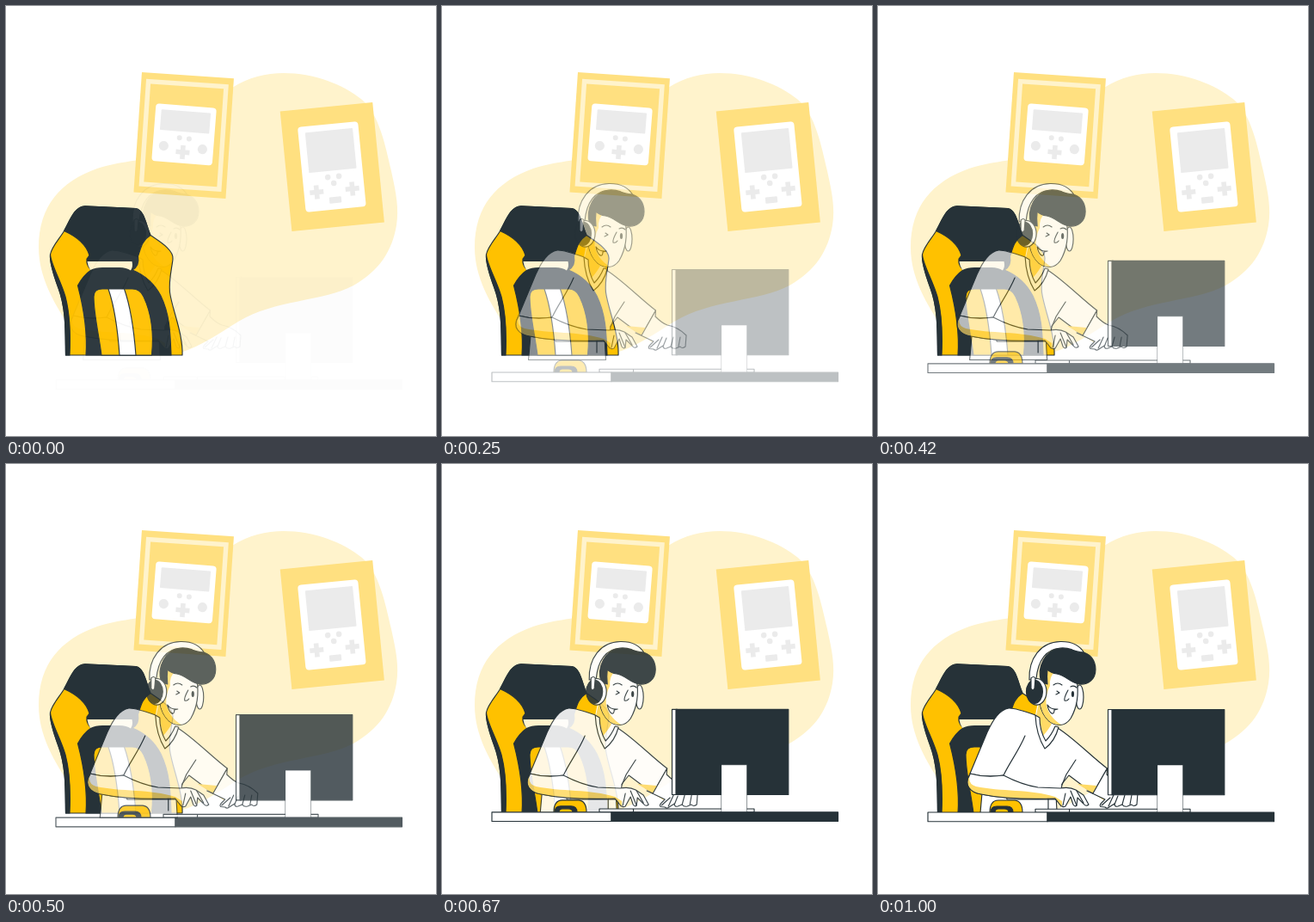
Animation, 500 px wide and 500 px high, one loop 1.04 s. Source, as an HTML page:

```html
<!DOCTYPE html>
<html lang="en">
<head>
<meta charset="utf-8">
<title>Gamer at a desk</title>
<style>
  html, body { margin: 0; width: 100%; height: 100%; overflow: hidden; background: #fff; }
  svg { display: block; width: 100vw; height: 100vh; }
  .pale { fill: #fff3cc; }
  .soft { fill: #ffe080; }
  .grey { fill: #ebebeb; }
  .white { fill: #fff; }
  .gold { fill: #ffc100; }
  .shade { fill: #ffda66; }
  .dark { fill: #263238; }
  .line { stroke: #263238; stroke-width: 1.15; stroke-linejoin: round; stroke-linecap: round; }
  .bare { fill: none; }
</style>
</head>
<body>
<svg viewBox="0 0 500 500">
  <defs>
    <path id="plus" d="M-2.8-8H2.8V-2.8H8V2.8H2.8V8H-2.8V2.8H-8V-2.8H-2.8Z"/>
  </defs>

  <path class="pale" d="M323 78C358 78 392 91 414 109C434 126 441 162 448 192C454 219 457 236 454 255C449 285 434 308 404 325C368 344 313 341 270 367C247 381 228 395 203 403C160 413 100 405 70 367C56 345 38 315 38 281C38 232 64 204 106 189C137 179 163 181 187 169C217 152 230 120 263 95C282 83 302 78 323 78Z"/>

  <!-- wall posters -->
  <g transform="translate(206.7 150.4) rotate(3.9)">
    <rect class="soft" x="-53.6" y="-70" width="107.2" height="140"/>
    <rect x="-45.3" y="-59.8" width="90.6" height="119.6" fill="none" stroke="#fff3cc" stroke-width="5.4"/>
    <g transform="translate(.3 -1) rotate(.6)">
      <rect class="white" x="-35.3" y="-33.5" width="70.6" height="67" rx="4"/>
      <g class="grey">
        <rect x="-28.5" y="-27.2" width="57.5" height="24" rx="1"/>
        <circle cx="-22.6" cy="15" r="5.6"/><circle cx="22.6" cy="15.5" r="5.6"/>
        <circle cx="-5" cy="4.3" r="3"/><circle cx="6.2" cy="4.5" r="3"/>
        <use href="#plus" y="20.6"/>
      </g>
    </g>
  </g>
  <g transform="translate(379.3 187) rotate(-5.6)">
    <rect class="soft" x="-54" y="-70" width="108" height="140"/>
    <rect class="white" x="-35.6" y="-49.8" width="70.4" height="99.4" rx="4"/>
    <g class="grey">
      <rect x="-27.5" y="-42.5" width="55.5" height="47" rx="1"/>
      <circle cx="-6.3" cy="11.6" r="3.3"/><circle cx="6.7" cy="11.6" r="3.3"/><circle cy="19.1" r="3.3"/>
      <use href="#plus" x="-20.8" y="27.6"/><use href="#plus" x="20.8" y="27.6"/>
      <rect x="-7" y="35" width="14" height="7.4" rx="1"/>
    </g>
  </g>

  <!-- chair -->
  <g class="line">
    <path class="gold" d="M69.500 406C69 378 70 352 61 328C54 309 51 296 51.500 289C53 280 62 271 68 261C75 248 80 233 92 232.700L151 235.500C161 237 163 256 168 266.500C177 273 195 283 194 294C193 305 189 318 190.500 333C193 352 206 381 205 406Z"/>
    <path class="dark" d="M51.500 289C52 300 64 320 69 338C75 361 75 383 74 406H69.500C69 378 70 352 61 328C54 309 51 296 51.500 289Z"/>
    <path class="dark" d="M67.500 261.500C75 248 80 233 92 232.700L151 235.500C161 237 163 256 168 266.500C158 273 157 281 153.500 291C155 299 152 304 147 307Q169 316 180 337C191 360 191 382 192 406H93C95 378 90 350 83.500 325Q90 313 99 307Q93 301 94 294L97 290C93 276 82 268 67.500 261.500Z"/>
    <path class="pale" stroke="none" d="M94.500 297H146.500Q148 303 145 307.500Q140 304 132 304H112Q104 304 98 307Q95 302 94.500 297Z"/>
    <path class="gold" d="M111 406C108 382 102 358 102 338Q102 329 112 329H147Q156 329 160 338C169 357 172 382 169.500 406Z"/>
    <path class="white" d="M119 329H137.500C146 353 149 380 151 406H132C130 378 127 352 119 329Z"/>
  </g>

  <g id="player" class="line">
    <!-- waist and shirt -->
    <path class="white" d="M121 383L118.500 411.500H208.500L207 385Z"/>
    <path class="white" d="M183 292C172 288 160 283.500 152 284C141 286 134 297 127 312L107 360Q125 365 146 362L150 390H212L214 372L222 362L250 383L266.500 354C248 340 228 319 209 307Z"/>
    <path class="bare" d="M171 316C164 333 153 347 146 362M230 344L219 361L214 373"/>

    <!-- far forearm and hand -->
    <path class="shade" d="M232 372L250 383L263 391L270 380L254 374Z" stroke="none"/>
    <path class="white" d="M250 383L266.500 354L266 361Q274 369 280 371Q292 373 302 383L301 396Q297 399 295 396L290 398Q286 399 284 396L279 398Q275 399 275 395L268 399.500Q266 401 264 399L259 398.500Q257 397 260 394L264 390L243 380Z"/>
    <path class="bare" d="M274 385L268 398M279 386L275 396M287 385L284 396M295 385L293 396M270 388L260 397"/>

    <!-- near forearm and hand -->
    <path class="white" d="M107 360Q125 365 146 362Q167 373 186 376L212 377Q223 375 230 379L239 385L245 396Q242 399 239 395L232 388L231 397Q229 399 227 396L224 387L218 398Q214 400 213 396L206 389C177 390 144 389 120 384C105 381 101 371 107 360Z"/>
    <path class="shade" stroke="none" d="M107 361.500Q104 372 114 375C142 381 178 378 206 387L214 392L214 398L206 389C177 390 144 389 120 384C105 381 101 371 107 361.500Z"/>
    <path class="bare" d="M107 361C99 373 107 382 120 384C144 389 177 390 206 389L213 398M218 383L215 397M224 380L231 397M231 380L239 394M198 389V403"/>

    <!-- neck and collar -->
    <path class="white" d="M186 277L183 292L188 301L194 322L208 305L205 290Z" stroke="none"/>
    <path class="shade" d="M187 278L184 292L188 299L192 316Q199 308 202 302L194 292Z" stroke="none"/>
    <path class="white" d="M183 292Q184 315 194 331Q206 322 210 306L206 305Q202 315 195 322Q188 310 188 295Z"/>

    <!-- head -->
    <ellipse class="white" cx="234.500" cy="271" rx="4.500" ry="14"/>
    <path class="white" d="M192 238L231 250C234 268 231 284 224 296C217 306 207 305 199 299Q190 291 188 277Z"/>
    <path class="shade" stroke="none" d="M190 237L206 241Q199 247 200 258Q195 267 195.500 278Q198 294 213 303Q204 304 198 298Q190 290 188.500 277Z"/>
    <path class="white" d="M176 251C175 226 189 207 212 206.500Q232 206 240 220L233 221Q225 213 212 214C196 215 186 228 184 250Z"/>
    <path class="dark" d="M190 254C184 236 195 215 213 214.500C222 214 228 218 235 218.500C247 219 253 229 253 239C253 251 244 257 234 256C223 254 219 246 208 244Q201 243 197 239Q196 247 197 256Z"/>
    <ellipse class="white" cx="184.500" cy="264.800" rx="11.500" ry="15.300"/>
    <ellipse class="dark" cx="182" cy="264.800" rx="9.500" ry="13.500"/>
    <path class="white" d="M178 249Q181 246 183 249L182 261Q180 264 178 261Z"/>
    <path class="bare" d="M221 263Q216 272 217 275Q220 276 222 273M204 257Q209 253 214 257M208 264L211 266L207 268M224 259Q228 257 231 260"/>
    <ellipse class="dark" stroke="none" cx="226.500" cy="267.500" rx="1.600" ry="3.500"/>
    <path class="white" d="M197 280Q198 287 202 290Q205 291 205 286L209 285Q201 286 197 280Z"/>
  </g>

  <g id="desk" class="line">
    <path class="white" d="M183 401.200H363V405.200H183ZM222.500 401.200V405.200"/>
    <rect class="white" x="267.500" y="285.500" width="6" height="99.200"/>
    <rect class="dark" x="272" y="285.500" width="130.800" height="99.200"/>
    <rect class="white" x="325" y="350" width="29.500" height="55.200" stroke-width=".5"/>
    <path class="gold" d="M130 405.200Q130 391 140 391H159Q168 392 168 405.200Z"/>
    <path class="dark" d="M131 405.200Q131 398 138 398H150Q157 398 157 405.200H152Q152 401 147 401H140Q136 401 136 405.200Z"/>
    <rect class="white" x="58" y="405" width="139" height="10.700"/>
    <rect class="dark" x="197" y="405" width="263.500" height="10.700"/>
  </g>
</svg>
<script>
  const LOOP = 1040, STEPS = 25, SLIDE = 30;
  const player = document.getElementById("player");
  const desk = document.getElementById("desk");
  const start = performance.now();

  const easeOut = (t, power) => 1 - (1 - t) ** power;

  const bezier = (a, b, s) => 3 * (1 - s) ** 2 * s * a + 3 * (1 - s) * s * s * b + s ** 3;

  // Cubic Bezier easing that overshoots before settling.
  function overshoot(t) {
    let low = 0, high = 1;
    for (let i = 0; i < 24; i++) {
      const mid = (low + high) / 2;
      if (bezier(.36, .5, mid) < t) low = mid; else high = mid;
    }
    return bezier(-.01, 1.38, high);
  }

  function place(part, dx, dy, opacity) {
    part.setAttribute("transform", `translate(${dx} ${dy})`);
    part.style.opacity = Math.max(0, Math.min(1, opacity));
  }

  function draw(now) {
    const ms = Math.max(0, now - start) % LOOP;
    const step = Math.min(STEPS - 1, Math.floor((ms + 5) * STEPS / LOOP));
    const slide = (step + .5) / STEPS;
    const rise = overshoot(Math.min(1, (step + 1.2) / STEPS));
    place(player, -SLIDE * (1 - easeOut(slide, 1.7)), 0, easeOut(slide, 2));
    place(desk, 0, SLIDE * (1 - rise), rise);
    requestAnimationFrame(draw);
  }
  draw(start);
</script>
</body>
</html>
```
